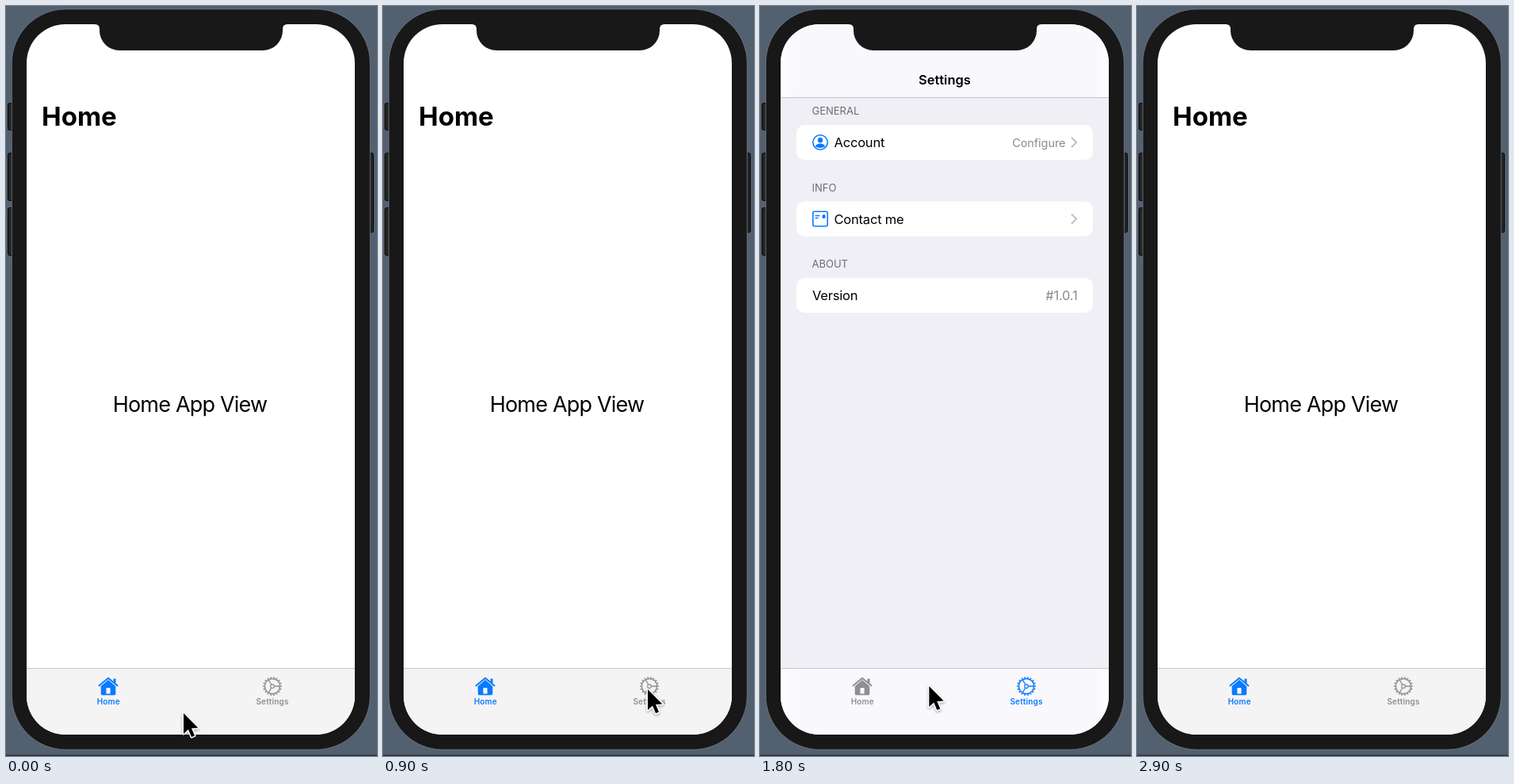
Recreate the animation shown at these times as an HTML page. Size 468 by 946 pixels, loop 3200 ms.

```html
<!DOCTYPE html>
<html lang="en">
<head>
<meta charset="utf-8">
<title>Tab bar demo</title>
<style>
  html, body { margin: 0; width: 100%; height: 100%; overflow: hidden; background: #536070; }
  svg { display: block; width: 468px; height: 946px; }
  text { font-family: Inter, "Liberation Sans", sans-serif; font-optical-sizing: none; }
  .header { font-size: 13px; fill: #6d6d72; }
  .row { font-size: 16.5px; letter-spacing: -.2px; }
  .detail { fill: #8a8a8e; }
  .tab text { font-size: 10px; font-weight: 600; letter-spacing: .15px; text-anchor: middle; fill: currentColor; }
  .line { fill: none; stroke: currentColor; }
  .blue { color: #0a7aff; }
</style>
</head>
<body>
<svg viewBox="0 0 468 946">
  <defs>
    <clipPath id="screenClip"><rect x="26" y="23" width="414" height="896" rx="49"/></clipPath>
    <linearGradient id="bar">
      <stop offset="0" stop-color="#fff"/>
      <stop offset=".04" stop-color="#f9f9fd"/>
      <stop offset=".96" stop-color="#f9f9fd"/>
      <stop offset="1" stop-color="#fff"/>
    </linearGradient>
    <filter id="shadow" x="-50%" y="-50%" width="200%" height="200%">
      <feDropShadow dx="0" dy="1.5" stdDeviation="1.5" flood-opacity=".35"/>
    </filter>
    <path id="chevron" d="M0 0l5.5 5.5L0 11" fill="none" stroke="#bfbfc3" stroke-width="2" stroke-linecap="round" stroke-linejoin="round"/>
  </defs>

  <rect width="468" height="946" fill="#536070"/>
  <rect y="944.5" width="468" height="1.5" fill="#2c343e"/>

  <g fill="#242424" stroke="#080808">
    <rect x="2.5" y="122.5" width="8" height="34" rx="2"/>
    <rect x="2.5" y="185.5" width="8" height="60" rx="2"/>
    <rect x="2.5" y="254.5" width="8" height="60" rx="2"/>
    <rect x="455.5" y="185.5" width="8" height="100" rx="2"/>
  </g>
  <rect x="7.3" y="4" width="452" height="934" rx="68" fill="#181818" stroke="#737c87" stroke-width=".8"/>

  <g clip-path="url(#screenClip)">
    <g id="homePage">
      <rect x="26" y="23" width="414" height="896" fill="#fff"/>
      <text x="45" y="151" font-size="33" font-weight="700">Home</text>
      <text x="232" y="511.5" font-size="27" letter-spacing="-.8" text-anchor="middle">Home App View</text>
      <rect x="26" y="835" width="414" height="84" fill="#f4f4f4"/>
    </g>

    <g id="settingsPage">
      <rect x="26" y="23" width="414" height="896" fill="#f0eff5"/>
      <rect x="26" y="23" width="414" height="92" fill="url(#bar)"/>
      <rect x="26" y="115" width="414" height="1" fill="#c3c3c8"/>
      <text x="233" y="99" font-size="16.5" font-weight="600" text-anchor="middle">Settings</text>

      <g fill="#fff">
        <rect x="46" y="150" width="374" height="44" rx="10"/>
        <rect x="46" y="246.5" width="374" height="44" rx="10"/>
        <rect x="46" y="343" width="374" height="44" rx="10"/>
      </g>
      <text class="header" x="65.5" y="137">GENERAL</text>
      <text class="header" x="65.5" y="233.5">INFO</text>
      <text class="header" x="65.5" y="330">ABOUT</text>

      <text class="row" x="93.5" y="178">Account</text>
      <text class="row" x="93.5" y="274.5">Contact me</text>
      <text class="row" x="66" y="371">Version</text>
      <text class="detail" x="385.5" y="178" font-size="14.4" text-anchor="end">Configure</text>
      <text class="row detail" x="400.5" y="371" text-anchor="end">#1.0.1</text>
      <use href="#chevron" x="393.5" y="166.5"/>
      <use href="#chevron" x="393.5" y="263"/>

      <g class="blue" fill="currentColor">
        <circle class="line" cx="76" cy="172" r="9.2" stroke-width="1.6"/>
        <circle cx="76" cy="169.3" r="3.2"/>
        <path d="M69.8 177.2c1-5 11.4-5 12.4 0q-6.2 3.6-12.4 0z"/>
        <rect class="line" x="66.8" y="259.3" width="18.4" height="18.4" rx="2" stroke-width="1.6"/>
        <path class="line" d="M69.5 264.5h6M69.5 267.5h4" stroke-width="1.4"/>
        <rect x="78.5" y="263" width="4" height="5" rx="1.8"/>
      </g>
      <rect x="26" y="835" width="414" height="84" fill="url(#bar)"/>
    </g>

    <rect x="26" y="835" width="414" height="1" fill="#c6c6c9"/>

    <g class="tab" id="homeTab">
      <path class="line" d="M117.5 857.3L129 847.7l11.5 9.6" stroke-width="2" stroke-linecap="round" stroke-linejoin="round"/>
      <path d="M135.5 848.5h3v6l-3-2.5z" fill="currentColor"/>
      <path fill="currentColor" fill-rule="evenodd" d="M129 850.1l9.3 7.8v9.6q0 1.8-1.8 1.8h-15q-1.8 0-1.8-1.8v-9.6zM126.4 861v6.5h5.2V861q0-1-1-1h-3.200q-1 0-1 1z"/>
      <text x="129.3" y="881">Home</text>
    </g>
    <g class="tab" id="settingsTab">
      <g class="line" transform="translate(336 858)">
        <circle r="9.6" stroke-width="1.5"/>
        <circle r="11.1" stroke-width="1.6" pathLength="36" stroke-dasharray="1" stroke-dashoffset=".5"/>
        <circle r="2.3" stroke-width="1.2"/>
        <path d="M2.3 0H9M-1.200-2L-4.600-7.900M-1.200 2L-4.600 7.900" stroke-width="1.3"/>
      </g>
      <text x="336" y="881">Settings</text>
    </g>
  </g>

  <path fill="#181818" d="M109 22h248v1h-2q-6 0-6 6v2a25 25 0 0 1-25 25H143a25 25 0 0 1-25-25v-2q0-6-6-6h-3z"/>

  <g id="cursor" filter="url(#shadow)">
    <path d="M1 3v26l6-5.5 4 9.500 4-1.600-4-9.300 8.400-.500z" stroke="#fff" stroke-width="3" stroke-linejoin="round" paint-order="stroke"/>
  </g>
</svg>

<script>
const LOOP = 3200, STEP = 100, SHOW_SETTINGS = 1200, SHOW_HOME = 2300;
const BLUE = '#0a7aff', GRAY = '#8e8e93';
const el = id => document.getElementById(id);
const clamp = v => Math.min(1, Math.max(0, v));
const mix = (a, b, p) => a + (b - a) * p;
const easeOut = (p, power) => 1 - (1 - p) ** power;
const easeInOut = p => p * p * p * (p * (p * 6 - 15) + 10);

function cursorAt(t) {
  if (t < SHOW_SETTINGS) {
    const p = clamp(t / 500);
    return [mix(223, 333, easeOut(p, 3.25)), mix(889, 859, easeOut(p, 5.2))];
  }
  const p = clamp((t - SHOW_SETTINGS) / 1080);
  return [mix(333, 133, easeInOut(p)), mix(859, 858, p) - 3.5 * Math.sin(Math.PI * p)];
}

function draw() {
  const t = Math.floor(performance.now() % LOOP / STEP) * STEP;
  const settings = t >= SHOW_SETTINGS && t < SHOW_HOME;
  el('homePage').style.display = settings ? 'none' : '';
  el('settingsPage').style.display = settings ? '' : 'none';
  el('homeTab').style.color = settings ? GRAY : BLUE;
  el('settingsTab').style.color = settings ? BLUE : GRAY;
  el('cursor').setAttribute('transform', `translate(${cursorAt(t)})`);
  el('cursor').style.opacity = 1 - clamp((t - 2500) / 200);
  requestAnimationFrame(draw);
}
draw();
</script>
</body>
</html>
```
